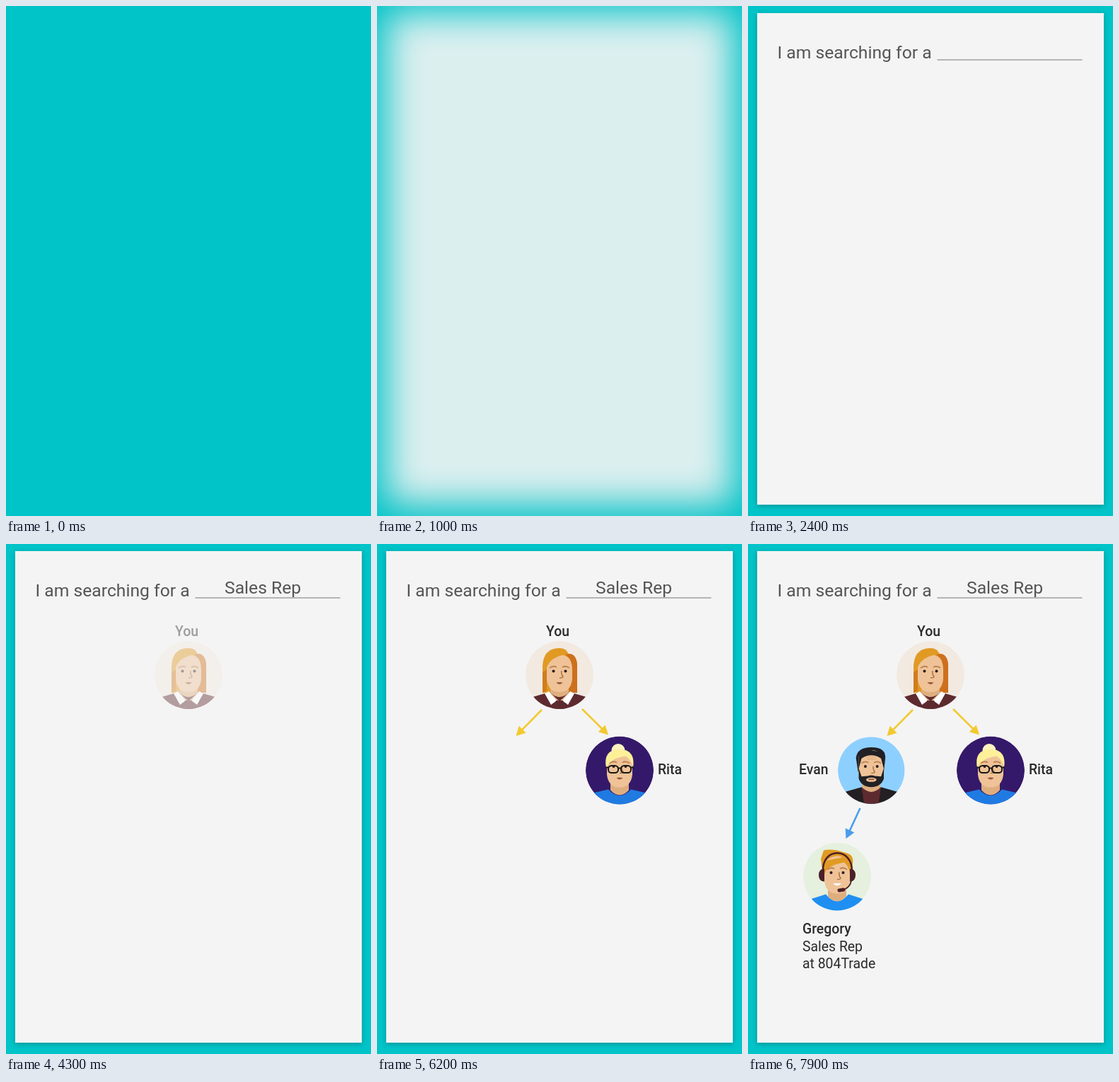
Write an HTML page that moves like this. It is 516 px wide and 720 px high and loops after 8000 ms.

```html
<!DOCTYPE html>
<html lang="en">
<head>
<meta charset="utf-8">
<title>Searching for a contact</title>
<style>
  html, body { margin: 0; width: 100%; height: 100%; overflow: hidden; background: #00c4c8; }
  #paper { position: absolute; left: 13px; top: 10px; width: 490px; height: 694px;
           background: #f4f4f4; box-shadow: 0 2px 7px rgba(0, 0, 0, .25); }
  svg { position: absolute; left: 0; top: 0; }
  text { font: 19.4px Roboto, sans-serif; fill: #2b2b2b; }
  .name { font-weight: 500; }
  .query { font-size: 24.7px; fill: #555; }
</style>
</head>
<body>
<div id="paper"></div>
<svg width="516" height="720" viewBox="0 0 516 720">
  <defs>
    <clipPath id="disc"><circle r="48"/></clipPath>
    <g id="face" fill="none" stroke="#b98352" stroke-width="1.8">
      <path d="M-14-10q5-4 10-1M14-10q-5-4-10-1"/>
      <path d="M3-6q-1 5 2 8q0 2-5 2" stroke="#a9713f" stroke-width="1.5"/>
      <path d="M-4.500 10.500q4.500-1 9 0q-4.500 5-9 0z" fill="#96583c" stroke="none"/>
      <g fill="#2b1a1c" stroke="none"><circle cx="-8.500" cy="-5.500" r="2"/><circle cx="8.500" cy="-5.500" r="2"/></g>
    </g>
    <path id="neck" d="M-13 8V28Q0 42 13 28V8z" fill="#dfae7f"/>
    <path id="head" d="M-18-20Q0-38 18-20V6Q16 24 0 24T-18 6z" fill="#efc397"/>
    <path id="torso" d="M-48 50L-38 31L-14 24Q0 38 14 24L38 31L48 50z"/>
  </defs>

  <g id="prompt">
    <text class="query" x="41.500" y="74">I am searching for a</text>
    <path d="M267.500 76H472.500" stroke="#777"/>
  </g>
  <text id="role" class="query" x="309" y="70">Sales Rep</text>

  <g id="you">
    <text class="name" x="255.500" y="129.500" text-anchor="middle">You</text>
    <g transform="translate(258 185)" clip-path="url(#disc)">
      <circle r="48" fill="#f2e9e1"/>
      <path d="M8-28Q25-33 25-12V25H10z" fill="#cd701d"/>
      <path d="M-24 25V-10Q-24-38 0-38Q10-38 13-29L-8 25z" fill="#e19a23"/>
      <path d="M-24 25V-4L-18-8V22z" fill="#d17c1c"/>
      <use href="#neck"/>
      <use href="#head"/>
      <path d="M-19-8Q-15-25 8-29Q18-25 19-8V-25L8-34L-18-27z" fill="#e19a23"/>
      <path d="M8-29Q18-23 18-7V25H25V-15Q23-30 14-30z" fill="#cd701d"/>
      <use href="#torso" fill="#5d2a30"/>
      <path d="M-14 24L0 37L14 24L8 38H-8z" fill="#dfae7f"/>
      <path d="M-21 26L-15 23L-4 36L-12 42zM21 26L15 23L4 36L12 42z" fill="#fff"/>
      <path d="M-5 36H5L10 48H-10z" fill="#5d2a30"/>
      <use href="#face"/>
    </g>
  </g>

  <g id="arrows"></g>

  <g id="right">
    <g transform="translate(343 319.500)" clip-path="url(#disc)">
      <circle r="48" fill="#34196a"/>
      <circle cx="-2" cy="-28" r="9.500" fill="#fdf3c0"/>
      <use href="#neck"/>
      <use href="#head"/>
      <path d="M-19-3Q-24-29 0-30Q23-29 19-3Q17-16 8-20Q-14-17-19-3z" fill="#fdf099"/>
      <path d="M-48 50L-38 32L-16 27Q0 44 16 27L38 32L48 50z" fill="#1f7be2"/>
      <use href="#face"/>
      <g fill="none" stroke="#171717" stroke-width="2">
        <rect x="-16" y="-6.500" width="14" height="10" rx="4.500"/>
        <rect x="2" y="-6.500" width="14" height="10" rx="4.500"/>
        <path d="M-20-4h4M-2-3h4M16-4h4"/>
      </g>
    </g>
    <text class="name" x="397" y="325">Rita</text>
  </g>

  <g id="left">
    <g transform="translate(174.300 319.500) scale(.985)" clip-path="url(#disc)">
      <circle r="48" fill="#8dd0ff"/>
      <path d="M-19 2L-22-18Q-20-33 0-33Q22-33 20-16L18 2z" fill="#222024"/>
      <use href="#neck"/>
      <use href="#head"/>
      <path d="M-18-2V-20Q-12-30 0-29L18-25V-2L14-17Q0-26-14-17z" fill="#222024"/>
      <path d="M-7-19h14M-6-16h13" stroke="#d9a674"/>
      <use href="#torso" fill="#231f23"/>
      <path d="M-14 24Q0 38 14 24L10 50H-10z" fill="#5d2a30"/>
      <use href="#face"/>
      <path d="M-18-3L-14 9Q-8 8-5 8Q0 6 5 8Q8 8 14 9L18-3V12Q14 24 0 24T-18 12z" fill="#222024"/>
      <ellipse cy="13.500" rx="7.500" ry="3" fill="#efc397"/>
      <path d="M-4 13h8" stroke="#96583c" stroke-width="2"/>
    </g>
    <text class="name" x="113.500" y="325" text-anchor="end">Evan</text>
  </g>

  <g id="link"></g>

  <g id="match">
    <g transform="translate(126 469.500)" clip-path="url(#disc)">
      <circle r="48" fill="#e6f0de"/>
      <path d="M-20 0L-23-25L-19-37Q-12-39 0-37L14-33Q24-30 22-18L19 0z" fill="#e19a23"/>
      <use href="#neck"/>
      <use href="#head"/>
      <path d="M-18-3V-22L12-28L18-20V-3Q17-15 10-20Q-15-16-18-3z" fill="#e19a23"/>
      <path d="M-48 50L-38 32L-16 25Q0 45 16 25L38 32L48 50z" fill="#1f8ff2"/>
      <use href="#face"/>
      <path d="M-6 9.500h12q-6 7-12 0z" fill="#fff"/>
      <g fill="none" stroke="#4b2028" stroke-width="2.500">
        <path d="M-20-7C-22-42 22-42 21-7"/>
        <path d="M20 5Q19 16 7 19" stroke-width="1.800"/>
        <path d="M3 19.500L9 18.500" stroke-width="5" stroke-linecap="round"/>
      </g>
      <path d="M-18-11Q-26-11-26-2T-18 7zM18-11Q26-11 26-2T18 7z" fill="#4b2028"/>
    </g>
    <text class="name" x="77" y="550">Gregory</text>
    <text x="77" y="574.500">Sales Rep</text>
    <text x="77" y="599">at 804Trade</text>
  </g>
</svg>
<script>
  const LOOP = 8000, STEP = 100;
  const $ = id => document.getElementById(id);
  const progress = (t, start, end) => Math.min(1, Math.max(0, (t - start) / (end - start)));

  function arrow(x1, y1, x2, y2, color) {
    const angle = Math.atan2(y2 - y1, x2 - x1) * 180 / Math.PI;
    const length = Math.hypot(x2 - x1, y2 - y1);
    return `<g transform="translate(${x1} ${y1}) rotate(${angle})">
      <path d="M0 0H${length - 10}" stroke="${color}" stroke-width="2.6"/>
      <path d="M${length} 0l-13-7v14z" fill="${color}"/></g>`;
  }
  $('arrows').innerHTML = arrow(233, 234, 196.5, 271, '#f3c92f') + arrow(290, 233, 327, 269.5, '#f3c92f');
  $('link').innerHTML = arrow(158.5, 373, 138.5, 416, '#4a9dec');

  // Fade-in start and end of each part, in ms
  const fades = {
    paper: [700, 1033], prompt: [1650, 2300], role: [2850, 3500], you: [4000, 4700],
    arrows: [4800, 5400], right: [5500, 6100], left: [6300, 6900], link: [7000, 7400], match: [7300, 7900]
  };

  function draw(now) {
    const t = Math.floor(now % LOOP / STEP) * STEP;
    for (const id in fades) $(id).style.opacity = progress(t, ...fades[id]);
    const blur = 38 * (1 - progress(t, 700, 1600));
    $('paper').style.filter = blur ? `blur(${blur}px)` : 'none';
    requestAnimationFrame(() => draw(performance.now() - origin));
  }
  const origin = performance.now();
  draw(0);
</script>
</body>
</html>
```
